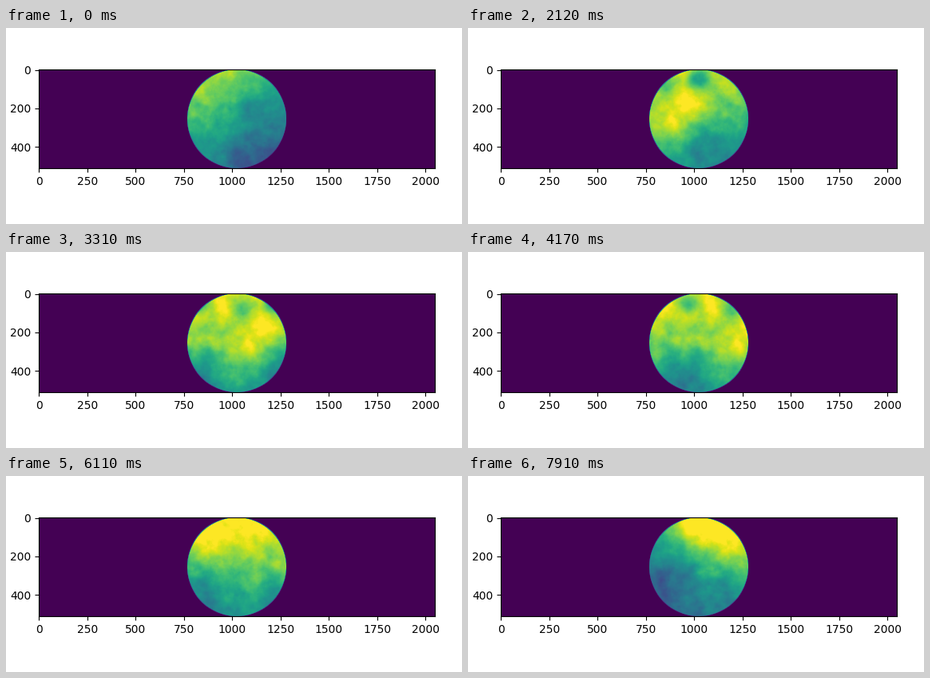
Animation of 571x246 px, one loop 8 s. Source, as a matplotlib script:

```python
import numpy as np
import matplotlib.pyplot as plt
from matplotlib.animation import FuncAnimation

W, H, DPI = 571, 246, 100
CELL = 4                      # screen units per sample
N = 512 // CELL               # pupil width in samples
STEPS, SHIFT = 66, 20 // CELL
FRAMES, INTERVAL = 200, 40
STEP_MS = 120.7

# Main crests and hollows: x, y, radius, height
BLOBS = [
    (-430, 310, 80, -0.16), (-310, 40, 70, 0.30), (-150, 110, 80, 0.22),
    (-150, 400, 80, -0.10), (60, 90, 60, 0.10), (250, 430, 80, -0.22),
    (275, 50, 40, -0.28), (500, 70, 45, -0.22), (615, 185, 60, 0.20),
    (515, 300, 60, 0.18), (670, 50, 45, -0.35), (700, 400, 90, -0.14),
    (1110, 200, 70, -0.12), (1070, 450, 80, -0.13),
]


def turbulence(rows, cols, seed=7):
    """Fine Kolmogorov-like detail with unit variance."""
    rng = np.random.default_rng(seed)
    f = np.hypot(np.fft.fftfreq(rows)[:, None], np.fft.fftfreq(cols))
    low = CELL / 180
    gain = np.where(f > low, np.maximum(f, low) ** (-11 / 6), 0)
    field = np.fft.ifft2(np.fft.fft2(rng.normal(size=f.shape)) * gain).real
    return field / field.std()


def phase_screen():
    """Long screen that drifts behind the pupil."""
    cols = N + STEPS * SHIFT
    x = 1280 - CELL * (cols - np.arange(cols) - 0.5)
    y = CELL * (np.arange(N)[:, None] + 0.5)
    level = 0.8 - 0.3 * ((x - 350) / 850) ** 2 - 0.22 * (y - 256) / 256
    for bx, by, radius, height in BLOBS:
        d2 = (x - bx) ** 2 + (y - by) ** 2
        level = level + height * np.exp(-d2 / (2 * radius ** 2))
    return level + 0.028 * turbulence(N, cols)


screen = np.clip(phase_screen(), 0, 1)
c = np.arange(N) - (N - 1) / 2
pupil = np.clip(N / 2 - np.hypot(c, c[:, None]) + 0.5, 0, 1)


def view(step):
    data = np.zeros((N, 4 * N))
    start = (STEPS - step) * SHIFT
    left = 3 * N // 2
    data[:, left:left + N] = screen[:, start:start + N] * pupil
    return data


fig = plt.figure(figsize=(W / DPI, H / DPI), dpi=DPI)
ax = fig.add_axes([41 / W, 69.6 / H, 496 / W, 124 / H])
image = ax.imshow(view(0), cmap="viridis", vmin=0, vmax=1, aspect="auto",
                  extent=(-0.5, 2047.5, 511.5, -0.5))
ax.set_xticks(range(0, 2001, 250))
ax.set_yticks([0, 200, 400])


def update(n):
    step = min(int(np.ceil(n * INTERVAL / STEP_MS)), STEPS)
    image.set_data(view(step))
    return [image]


anim = FuncAnimation(fig, update, frames=FRAMES, interval=INTERVAL,
                     repeat=True, repeat_delay=0, blit=False)
plt.show()
```
